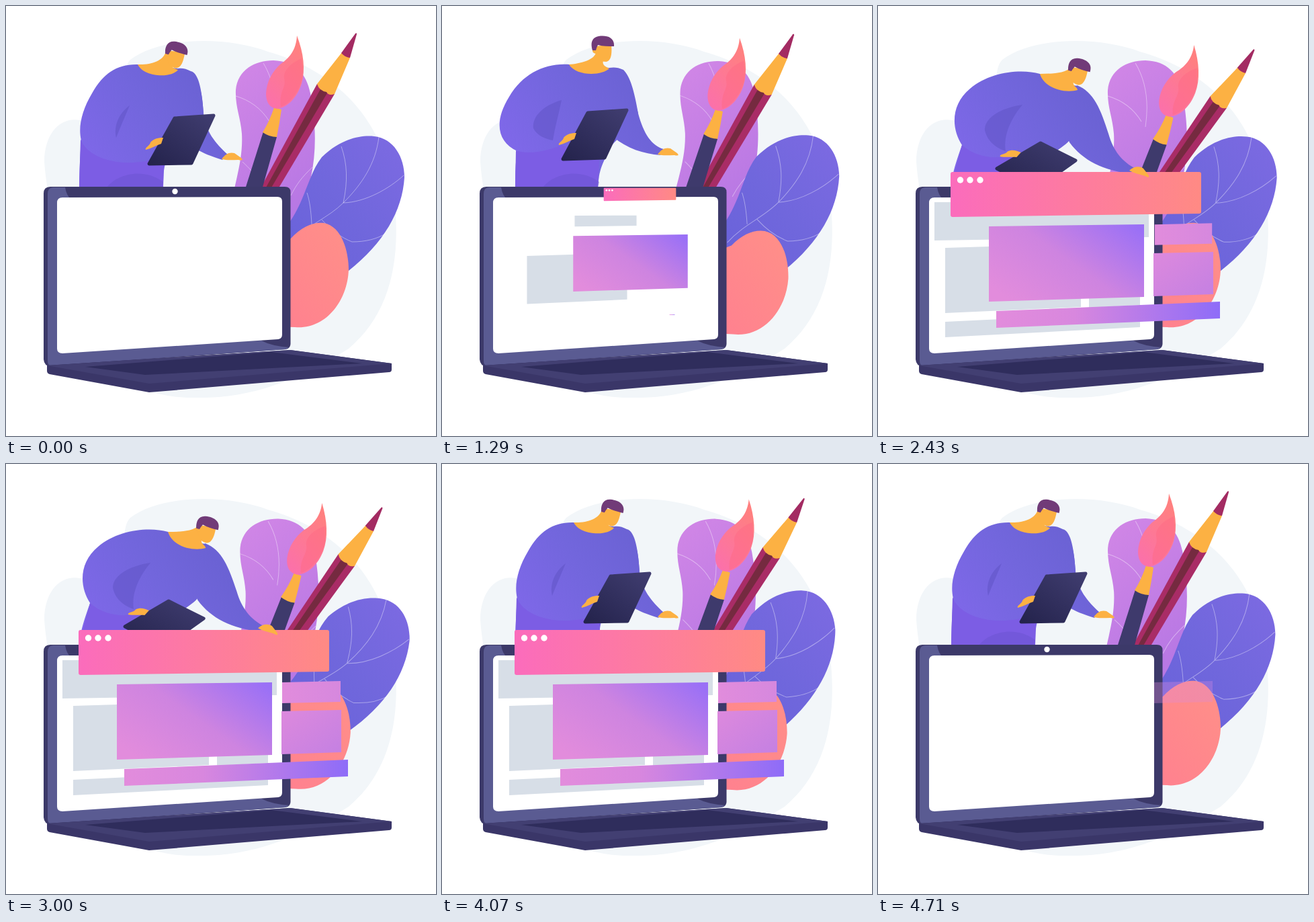
An HTML page for the animation above (4780 ms loop, 640 by 640 pixels).

```html
<!DOCTYPE html>
<html lang="en">
<head>
<meta charset="utf-8">
<title>Web design</title>
<style>
html, body { margin: 0; width: 100%; height: 100%; overflow: hidden; background: #fff; }
svg { display: block; width: 100vw; height: 100vh; }
.tile { transform-box: fill-box; transform-origin: center; }
.vein { fill: none; stroke: #fff; stroke-opacity: .4; }
.skin { fill: #fcb143; }
.cloth { fill: url(#cloth); }
</style>
</head>
<body>
<svg viewBox="0 0 640 640">
  <defs>
    <linearGradient id="cloth" gradientUnits="userSpaceOnUse" x1="110" y1="240" x2="290" y2="110">
      <stop stop-color="#8068ea"/><stop offset=".6" stop-color="#7266dc"/><stop offset="1" stop-color="#6b62d4"/>
    </linearGradient>
    <linearGradient id="violet" x1="0" y1="0" x2=".4" y2="1"><stop stop-color="#d287e6"/><stop offset="1" stop-color="#b878e4"/></linearGradient>
    <linearGradient id="blue" x1="0" y1="1" x2="1" y2="0"><stop stop-color="#6861da"/><stop offset=".5" stop-color="#7067dc"/><stop offset="1" stop-color="#7d6ae2"/></linearGradient>
    <linearGradient id="coral" x1="0" y1="1" x2="1" y2="0"><stop stop-color="#ff7f90"/><stop offset="1" stop-color="#ff9088"/></linearGradient>
    <linearGradient id="bristle" x1="0" y1="1" x2=".5" y2="0"><stop stop-color="#fb6fae"/><stop offset="1" stop-color="#ff8080"/></linearGradient>
    <linearGradient id="barFill"><stop stop-color="#fb6cbc"/><stop offset="1" stop-color="#ff8a84"/></linearGradient>
    <linearGradient id="pane" x1="0" y1=".8" x2="1" y2=".1"><stop stop-color="#e28cdc"/><stop offset=".5" stop-color="#ce84e0"/><stop offset="1" stop-color="#9a70f6"/></linearGradient>
    <linearGradient id="strip"><stop stop-color="#e28cdc"/><stop offset=".35" stop-color="#d887de"/><stop offset="1" stop-color="#8e6cf8"/></linearGradient>
    <linearGradient id="chip" x1="0" y1="0" x2="1" y2="1"><stop stop-color="#dd89dd"/><stop offset="1" stop-color="#c480e2"/></linearGradient>
    <linearGradient id="tab"><stop stop-color="#e18cdc"/><stop offset="1" stop-color="#d688de"/></linearGradient>
    <linearGradient id="slate" x1="0" y1="1" x2="1" y2="0"><stop stop-color="#24234c"/><stop offset="1" stop-color="#403d70"/></linearGradient>
  </defs>

  <path fill="#f2f6f9" d="M185,80C230,45 330,45 390,68C470,90 560,150 577,280C590,380 570,460 510,510C430,560 360,585 280,583C230,583 200,570 160,550C110,500 60,300 57,230C58,190 80,165 110,170L150,175C190,160 165,100 185,80Z"/>

  <g id="violetLeaf">
    <path fill="url(#violet)" d="M336,290C343,255 353,225 351,190C349,165 341,150 342,125C345,95 370,81 398,81C430,82 447,100 453,130C463,180 463,235 446,283C440,301 433,312 424,324L400,330Z"/>
    <path class="vein" d="M383,85C398,110 404,140 398,180M342,134C362,140 380,152 392,172M352,232C372,250 378,262 381,280M456,240C440,255 432,266 424,282"/>
  </g>
  <g id="blueLeaf">
    <path fill="url(#blue)" d="M412,335C446,295 447,255 470,225C500,196 530,192 548,194C577,197 593,225 593,255C590,305 562,353 510,394L412,410Z"/>
    <path class="vein" d="M425,352C450,325 480,315 502,293C530,265 550,235 555,195M502,293C509,260 508,235 499,209M502,293C535,292 570,272 592,252M470,318C485,335 500,345 515,351C535,351 552,347 566,338M455,325C454,305 452,290 448,278"/>
  </g>
  <g id="coralLeaf">
    <path fill="url(#coral)" d="M390,360L424,346C440,328 458,321 473,323C500,328 510,365 510,393C508,440 475,482 430,478L390,477Z"/>
  </g>

  <g id="pencil">
    <path fill="#a92c66" d="M463,116L489,131L373,326L349,326Z"/>
    <path fill="#752a40" d="M469,122L479,128L362,326L356,326Z"/>
    <path class="skin" d="M500,69L512,77L489,131Q480,134 477,128Q466,126 463,116Z"/>
    <path fill="#a32b62" d="M520,41Q522,39 522,42L512,77Q504,76 499,70Z"/>
  </g>
  <g id="brush">
    <path fill="#3e3a6c" d="M383,187L403,195L366,326L339,326Z"/>
    <path class="skin" d="M399,151L410,154Q407,175 403,195Q392,195 382,188Q393,170 399,151Z"/>
    <path fill="url(#bristle)" d="M433,44C443,70 446,95 440,115C434,135 420,151 404,153C392,152 387,143 387,130C388,112 397,97 408,87C421,78 432,66 433,44Z"/>
    <path fill="#ff6a86" opacity=".5" d="M440,78C425,84 413,95 414,107C418,122 406,125 409,150C424,146 440,122 442,100Z"/>
  </g>

  <g id="person">
    <path class="cloth" id="body"/>
    <path fill="#7c5de4" id="lower"/>
    <path fill="#6852cc" opacity=".45" d="M150,270C165,250 205,240 234,262L232,270Z"/>
    <path class="cloth" id="arm"/>
    <path fill="#5f52c4" opacity=".5" id="fold"/>
    <path class="skin" id="neck"/>
    <g id="head">
      <path class="skin" d="M229,60L252,57C253,68 253,82 244,83C235,83 231,79 229,71Q223,70 224,65Q226,61 229,64Z"/>
      <path fill="#713b78" d="M224,66C221,57 222,47 233,45C246,43 257,47 256,60C247,60 240,60 232,58Q230,62 229,66Z"/>
    </g>
    <path fill="url(#slate)" stroke="url(#slate)" stroke-width="5" stroke-linejoin="round" id="tablet"/>
    <path class="skin" id="leftHand" d="M208,214C206,211 215,207 215,203C220,197 227,196 234,196L231,205C224,207 217,212 208,214Z"/>
  </g>

  <g id="laptop">
    <path fill="#3c3969" d="M56,279Q56,269 66,269L415,269Q423.500,269 423.500,277L423.500,503Q423,510 416,511L68,536Q57,537 56,526Z"/>
    <path fill="#5a5b92" d="M62,280Q62,270 70,270L88,270Q90,282 97,288L90,510L380,498Q395,506 421,508L416,511L66,535Q62,535 62,528Z"/>
    <path fill="#fff" d="M76,293Q76,285 84,285L404,284Q411,284 411,291L411,489Q411,495 405,496L84,517Q76,517 76,510Z"/>
    <circle cx="251.500" cy="276" r="4.200" fill="#fff"/>
    <path fill="#3a3668" d="M61,535L423,512L574,532L574,541Q574,545 570,545L213,575L65,548Q61,547 61,543Z"/>
    <path fill="#423f72" d="M61,535L423,512L574,532L213,562Z"/>
    <path fill="#2f2d5c" d="M118,537L395,515L530,532L207,549Z"/>
  </g>

  <g id="tiles"></g>
  <path class="skin" id="rightHand" d="M321,228C326,220 333,217 340,219L350,226C354,230 350,230 346,229C337,229 329,230 321,228Z"/>
</svg>

<script>
const LOOP = 4780, STEP = 71.25;
const $ = id => document.getElementById(id);
const clamp = x => Math.max(0, Math.min(1, x));
const smooth = (t, a, b) => { const x = clamp((t - a) / (b - a)); return x * x * (3 - 2 * x); };
const outCubic = x => 1 - (1 - x) ** 3;
const outBack = x => 1 + 2.7 * (x - 1) ** 3 + 1.7 * (x - 1) ** 2;

// Blend every number in two strings of the same structure
function mix(a, b, k) {
  const target = b.match(/-?[\d.]+/g);
  let i = 0;
  return a.replace(/-?[\d.]+/g, n => (+n + (target[i++] - n) * k).toFixed(2));
}

// Poses: upright, reaching back, leaning over, lifting the hand
const poses = {
  person: ['transform', 'translate(0 0)', 'translate(0 0)', 'translate(0 0)', 'translate(2 0)'],
  body: ['d',
    'M197,87C165,86 145,100 128,130C113,155 107,180 112,200C110,225 109,250 109,270L234,270C234,240 236,235 245,215C265,180 290,190 294,160C292,130 288,100 275,97C268,93 262,92 256,93Z',
    'M190,87C155,84 120,100 100,135C77,172 82,202 112,216C109,235 109,250 109,270L232,270C234,240 240,235 250,210C268,190 290,175 292,160C286,125 280,105 270,95C262,91 255,91 249,92Z',
    'M241,101C213,93 166,98 137,123C108,147 109,182 125,207C116,232 111,248 108,270L232,270C235,250 240,235 255,222C268,214 278,208 285,200C305,185 320,165 318,138C312,130 306,124 297,119C290,118 285,117 280,116Z'],
  lower: ['d',
    'M111,198C120,225 165,240 212,230L235,236L234,270L109,270Z',
    'M110,215C130,222 160,215 178,207L234,228L232,270L109,270Z',
    'M125,207C142,222 165,228 190,224L240,230L232,270L108,270Z'],
  arm: ['d',
    'M256,93C284,94 292,120 294,160C296,185 312,205 330,221L322,229C305,224 292,218 285,214C270,200 262,150 256,93Z',
    'M249,92C280,92 282,120 292,160C300,190 312,208 330,213L325,222C300,220 275,212 255,195C245,170 250,130 249,92Z',
    'M296,118C321,127 332,155 343,190C350,215 363,232 385,243L378,250C335,245 305,230 285,203C275,180 280,140 296,118Z',
    'M296,118C321,125 332,152 347,182C357,206 372,224 394,234L389,243C343,240 308,225 289,198C276,180 280,140 296,118Z'],
  fold: ['d',
    'M184,148C168,160 160,178 164,196C170,180 177,165 184,148Z',
    'M178,140C150,148 134,165 136,182C142,194 155,198 165,200C168,180 174,160 178,140Z',
    'M215,147C180,152 158,168 159,185C163,203 178,212 190,216C186,190 200,165 215,147Z'],
  neck: ['d',
    'M238,68C234,82 215,88 196,87C205,106 246,108 256,95C250,93 246,91 246,87Z',
    'M229,68C229,80 205,86 189,87C200,105 238,104 249,93C243,90 238,88 240,81Z',
    'M286,92C279,100 258,101 241,101C248,124 280,130 297,125C297,121 289,119 291,113Z'],
  head: ['transform',
    'translate(13 9) rotate(14 240 64)', 'translate(0 0) rotate(0 240 64)',
    'translate(59 34) rotate(15 240 64)'],
  tablet: ['d',
    'M251,167L309,163L276,234L213,235Z', 'M217,159L275,155L242,226L180,228Z',
    'M242,204L294,230L235,272L177,242Z'],
  leftHand: ['transform',
    'translate(0 0) rotate(0 208 213)', 'translate(-34 -7) rotate(0 208 213)',
    'translate(-26 10) rotate(24 208 213)'],
  rightHand: ['transform',
    'translate(0 0) rotate(0 322 228)', 'translate(0 -7) rotate(0 322 228)',
    'translate(53 17) rotate(17 322 228)', 'translate(69 9) rotate(14 322 228)']
};
const poseKeys = [[150, 0], [1210, 1], [1290, 1], [1800, 2], [2900, 2], [3500, 3], [4040, 0]];

function posePerson(t) {
  let i = 0;
  while (i < poseKeys.length - 2 && t > poseKeys[i + 1][0]) i++;
  const [t0, from] = poseKeys[i], [t1, to] = poseKeys[i + 1], k = smooth(t, t0, t1);
  for (const [id, [attr, ...list]] of Object.entries(poses)) {
    const at = n => list[n] || list[2];
    $(id).setAttribute(attr, mix(at(from), at(to), k));
  }
}

const quad = (points, fill) => `<path fill="${fill}" d="M${points}Z"/>`;
const GREY = '#d7dee7';
const bar = '<path fill="url(#barFill)" d="M108,250Q108,247 111,247L478,247Q481,247 481,250L481,306Q481,309 478,309L111,314Q108,314 108,311Z"/>' +
  [122.5, 137, 152].map(x => `<circle cx="${x}" cy="259" r="4.700" fill="#fff"/>`).join('');

// Markup, start, duration, easing, fade start
const tiles = [
  [quad('84,292L403,291L403,344L84,349', GREY), 1165, 1095, outCubic, 4100],
  [quad('100,360L302,354L302,448L100,457', GREY), 888, 1095, outCubic, 4150],
  [quad('314,356L390,353L390,445L314,449', GREY), 1240, 1095, outCubic, 4200],
  [quad('100,470L390,456L390,478L100,493', GREY), 1282, 690, outBack, 4150],
  [quad('165,328L396,325L396,433L165,440', 'url(#pane)'), 888, 1095, outCubic, 4150],
  [quad('410,368L499,366L499,429L410,432', 'url(#chip)'), 1290, 1040, outCubic, 4200],
  [quad('411,325L498,323L498,354L411,356', 'url(#tab)'), 1617, 1095, outCubic, 4400],
  [quad('176,454L509,440L509,465L176,479', 'url(#strip)'), 1279, 690, outBack, 4150],
  [bar, 1165, 1095, outCubic, 4100]
];
$('tiles').innerHTML = tiles.map(([markup]) => `<g class="tile">${markup}</g>`).join('');
const tileNodes = [...$('tiles').children];

const rotate = (id, angle, x, y, shift = '0 0') =>
  $(id).setAttribute('transform', `translate(${shift}) rotate(${angle} ${x} ${y})`);

function draw(t) {
  const phase = t / LOOP * 4 * Math.PI, sway = (1 - Math.cos(phase)) / 2;
  rotate('violetLeaf', 1.7 * sway, 370, 560);
  rotate('blueLeaf', 3.3 * Math.sin(phase), 440, 390);
  rotate('coralLeaf', 1.7 * sway, 440, 478, `${3 * sway} ${11 * sway}`);
  rotate('pencil', 5.4 * (smooth(t, 1139, 2169) - smooth(t, 3514, 4544)), 285, 460);
  rotate('brush', 4.1 * (smooth(t, 936, 1963) - smooth(t, 3637, 4667)), 255, 572);
  posePerson(t);
  tiles.forEach(([, start, length, ease, fade], i) => {
    const x = clamp((t - start) / length);
    tileNodes[i].style.transform = `scale(${x && ease(x)})`;
    tileNodes[i].style.opacity = 1 - clamp((t - fade) / 450);
  });
}

function tick() {
  const t = performance.now() % LOOP;
  draw(Math.floor(t / STEP + .05) * STEP);
  requestAnimationFrame(tick);
}
tick();
</script>
</body>
</html>
```
